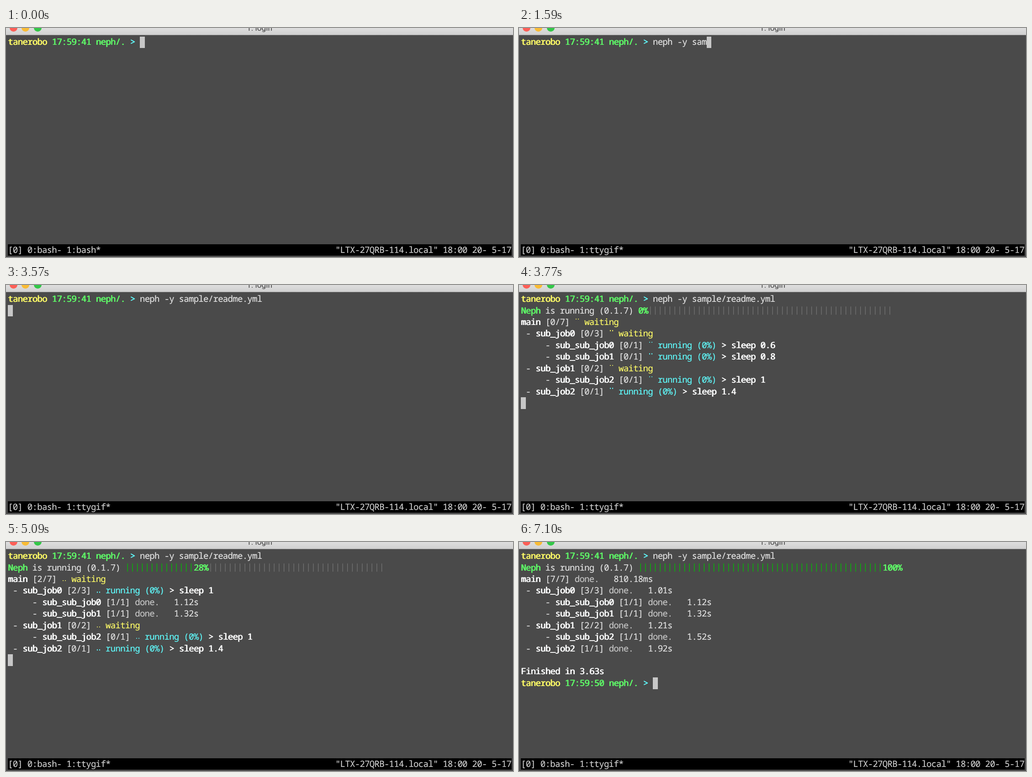
An HTML page for the animation above (8000 ms loop, 1110 px wide and 504 px high).

```html
<!DOCTYPE html>
<html lang="en">
<head>
<meta charset="utf-8">
<title>Terminal</title>
<style>
  html, body { margin: 0; width: 1110px; height: 504px; overflow: hidden; background: #4a4a4a; }
  body { position: relative; }
  #bar {
    position: absolute; left: 0; top: 0; width: 100%; height: 16px; overflow: hidden;
    background: linear-gradient(#dedede, #d0d0d0); border-bottom: 1px solid #8c8c8c; box-sizing: border-box;
  }
  #bar i { position: absolute; top: -9px; width: 17px; height: 17px; border-radius: 50%; }
  #bar span {
    position: absolute; left: 0; top: -10px; width: 100%; text-align: center;
    font: 17.3px/20px Roboto, sans-serif; color: #404040;
  }
  #screen, #status {
    position: absolute; left: 4px; width: 1103px; white-space: pre;
    font: 19px/25.43px "Noto Sans Mono", monospace; letter-spacing: -0.7px;
    font-variant-ligatures: none; text-rendering: geometricPrecision;
    -webkit-text-stroke: 0.2px;
  }
  #screen { top: 18.2px; color: #e5e5e5; }
  #screen div { height: 25.43px; }
  #status { top: 476px; height: 25px; line-height: 25px; background: #000; color: #d0d0d0; }
  #cursor { position: absolute; width: 10.7px; height: 25.43px; background: #c7c7c7; }
  b { font-weight: 400; text-shadow: 0.9px 0 currentColor; }
  .y { color: #fffc67; }
  .g { color: #5ffa68; }
  .c { color: #60fdff; }
  .w { color: #feffff; }
  .d { color: #c7c7c7; }
  .on, .off {
    position: relative; top: -2px; font-size: 18px; line-height: 0; letter-spacing: -0.1px;
    -webkit-text-stroke: 0;
  }
  .on { color: #00c200; }
  .off { color: #737373; }
  .spin { position: relative; }
  .spin i { position: absolute; width: 2.4px; height: 2.4px; border-radius: 1px; background: currentColor; }
</style>
</head>
<body>
<div id="bar">
  <i style="left:7.5px;background:#fc5f57"></i>
  <i style="left:34px;background:#f9bc35"></i>
  <i style="left:60.5px;background:#33c748"></i>
  <span>1. login</span>
</div>
<div id="cursor"></div>
<div id="screen"></div>
<div id="status"></div>
<script>
const LOOP = 8000, CELL = 10.7, ROW = 25.43;
const COMMAND = 'neph -y sample/readme.yml';
const ENTER = 3570, START = 3670, FINISH = 7100;

// [time, characters typed]
const typing = [[0, 0], [580, 1], [660, 2], [750, 3], [830, 4], [910, 5], [1130, 7], [1430, 9],
  [1590, 11], [2910, 15], [2970, 16], [3130, 17], [3470, 25]];

const ticks = [[3670, '⠁'], [3770, '⠉'], [3870, '⠙'], [3970, '⠚'], [4070, '⠒'], [4270, '⠂'],
  [4480, '⠲'], [4680, '⠴'], [4780, '⠤'], [4880, '⠄'], [5090, '⠤'], [5190, '⠠'], [5290, '⠤'],
  [5390, '⠦'], [5590, '⠖'], [5690, '⠒'], [5790, '⠐'], [6000, '⠒'], [6100, '⠓'], [6300, '⠋'],
  [6400, '⠉'], [6600, '⠈'], [6700, '⠁'], [6800, '⠉']];

const job = (depth, name, command, run, done, took) => ({ depth, name, command, run, done, took });
const jobs = [
  job(0, 'main', 'sleep 0.8', 6300, 7000, '810.18ms'),
  job(1, 'sub_job0', 'sleep 1', 4880, 6000, '1.01s'),
  job(2, 'sub_sub_job0', 'sleep 0.6', 0, 4680, '1.12s'),
  job(2, 'sub_sub_job1', 'sleep 0.8', 0, 4880, '1.32s'),
  job(1, 'sub_job1', 'sleep 1.2', 5190, 6300, '1.21s'),
  job(2, 'sub_sub_job2', 'sleep 1', 0, 5190, '1.52s'),
  job(1, 'sub_job2', 'sleep 1.4', 0, 5590, '1.92s')
];
const indents = ['', ' - ', '     - '];

// A job together with everything nested below it
jobs.forEach((j, i) => {
  let end = i + 1;
  while (end < jobs.length && jobs[end].depth > j.depth) end++;
  j.tree = jobs.slice(i, end);
});

const $ = id => document.getElementById(id);
const span = (cls, text) => `<span class="${cls}">${text}</span>`;
const bold = (cls, text) => `<b class="${cls}">${text}</b>`;
const at = (list, t) => list.reduce((value, [time, v]) => t >= time ? v : value, list[0][1]);
const countDone = (list, t) => list.filter(j => t >= j.done).length;

const prompt = clock => bold('y', 'tanerobo') + ' ' + bold('g', clock + ' neph/.') + ' ' + bold('c', '&gt;') + ' ';

function spinner(color, t) {
  const bits = at(ticks, t).charCodeAt(0) - 0x2800;
  let dots = '';
  for (let k = 0; k < 6; k++) {
    if (bits >> k & 1) dots += `<i style="left:${2.3 + 5 * (k / 3 | 0)}px;top:${5.9 + 5 * (k % 3)}px"></i>`;
  }
  return span('spin ' + color, ' ' + dots) + ' ';
}

function jobLine(j, t) {
  const head = `${indents[j.depth]}${bold('w', j.name)} [${countDone(j.tree, t)}/${j.tree.length}] `;
  if (t >= j.done) return head + span('d', 'done.') + '   ' + j.took;
  if (t < j.run) return head + spinner('y', t) + span('y', 'waiting');
  return head + spinner('c', t) + span('c', 'running (0%)') + bold('w', ' &gt; ' + j.command);
}

function progressLine(t) {
  const percent = Math.floor(100 * countDone(jobs, t) / jobs.length);
  const filled = percent >> 1;
  return bold('g', 'Neph') + ' is running (0.1.7) ' + span('on', '|'.repeat(filled)) +
    bold('g', percent + '%') + span('off', '|'.repeat(50 - filled));
}

let shown = '';
function draw(now) {
  const t = now % LOOP;
  const typed = at(typing, t);
  const lines = [prompt('17:59:41') + COMMAND.slice(0, typed)];
  let row = 0, col = 27 + typed;
  if (t >= ENTER) [row, col] = [1, 0];
  if (t >= START) {
    lines.push(progressLine(t), ...jobs.map(j => jobLine(j, t)));
    row = 9;
  }
  if (t >= FINISH) {
    lines.push(' ', bold('w', 'Finished in 3.63s'), prompt('17:59:50'));
    [row, col] = [11, 27];
  }
  const html = lines.map(line => `<div>${line}</div>`).join('');
  const status = `[0] 0:bash- 1:${t < 500 ? 'bash' : 'ttygif'}*`.padEnd(67) + '"LTX-27QRB-114.local" 18:00 20- 5-17';
  const key = html + status + row;
  if (key !== shown) {
    shown = key;
    $('screen').innerHTML = html;
    $('status').textContent = status;
    $('cursor').style.left = 4 + col * CELL + 'px';
    $('cursor').style.top = 18.6 + row * ROW + 'px';
  }
  requestAnimationFrame(draw);
}
draw(performance.now());
</script>
</body>
</html>
```
